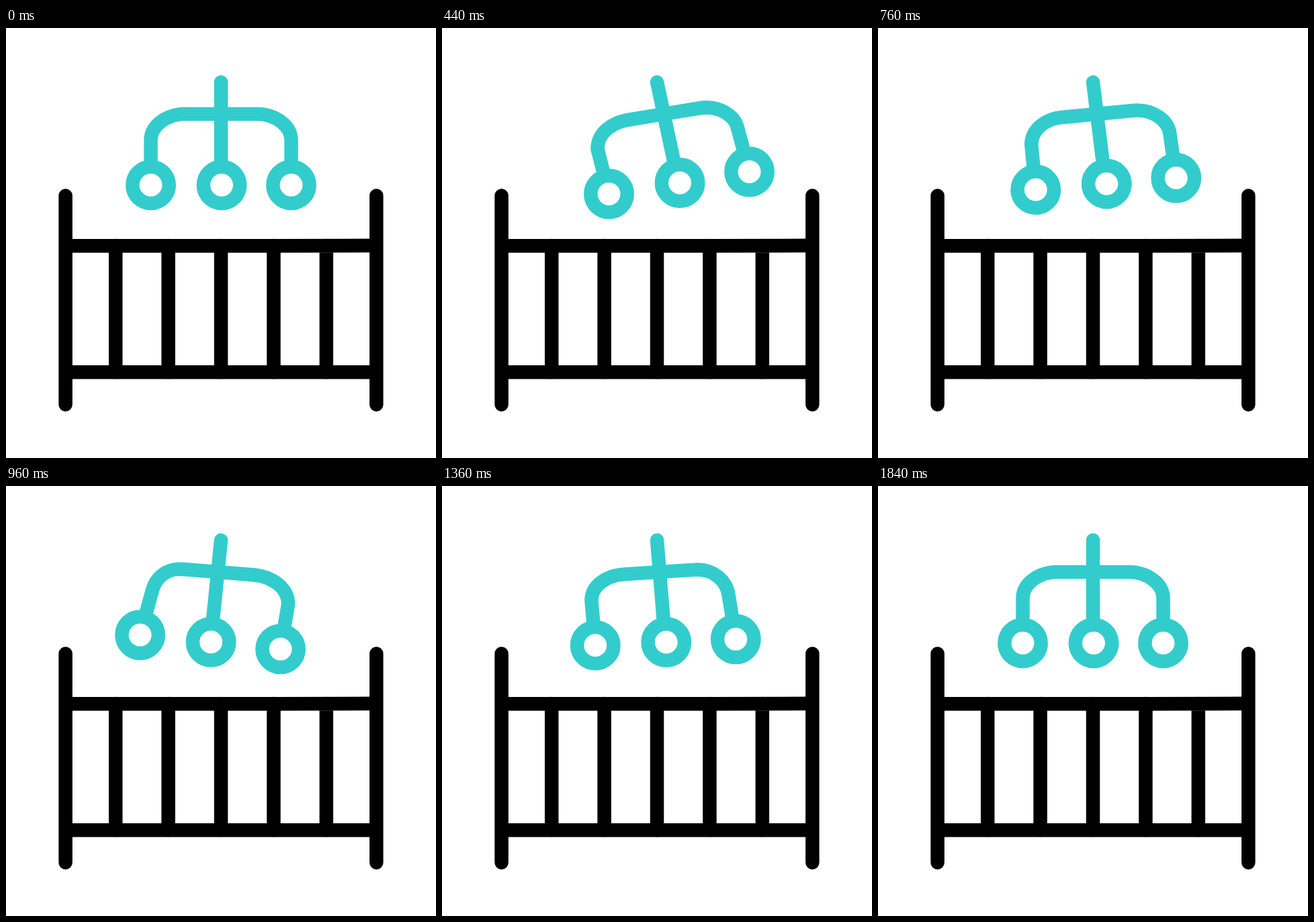
Animation of 640x640 px, one loop 2000 ms. Source, as an HTML page:

```html
<!DOCTYPE html>
<html lang="en">
<head>
<meta charset="utf-8">
<title>Crib mobile</title>
<style>
  html, body { margin: 0; width: 100%; height: 100%; overflow: hidden; background: #fff; }
  svg { display: block; width: 100vw; height: 100vh; }
  .crib, .mobile { fill: none; stroke-width: 20.5; stroke-linejoin: round; }
  .crib { stroke: #000; }
  .mobile { stroke: #33cccc; }
  .mobile circle { fill: #fff; }
  .round, #rod { stroke-linecap: round; }
  .seam { stroke: #444; stroke-width: .6; }
</style>
</head>
<body>
<svg viewBox="0 0 640 640">
  <g class="crib">
    <path class="round" d="M88.6 249.4V560.6M551.3 249.4V560.6"/>
    <path d="M88.6 324.2H398L551.3 323.8M88.6 512.2H551.3"/>
    <path class="round" id="slats"/>
    <path class="seam" d="M467 334.4H487"/>
  </g>
  <g class="mobile">
    <path id="rod"/>
    <path id="bar"/>
    <circle id="left" r="27.2"/>
    <circle id="mid" r="27.2"/>
    <circle id="right" r="27.2"/>
  </g>
</svg>
<script>
const LOOP = 2000, STEP = 40;
const CENTER = 320, BAR_Y = 128, BAR_HALF = 53, RING_Y = 233.8, SPREAD = 104.5, LEG = 66.8;
const ROUND = .55;
const $ = id => document.getElementById(id);

// [ms, half swings completed]
const pace = [[80, 0], [440, .78], [560, 1], [760, 1.39], [1000, 2], [1400, 3], [1840, 4]];

function phaseAt(t) {
  if (t <= pace[0][0]) return 0;
  const i = pace.findIndex(([ms]) => ms >= t);
  if (i < 0) return 4;
  const [t0, p0] = pace[i - 1], [t1, p1] = pace[i];
  return p0 + (p1 - p0) * (t - t0) / (t1 - t0);
}

// Starts and ends at zero, easing through the three turning points
function swing(phase, ...turns) {
  const stops = [0, ...turns, 0, 0];
  const i = Math.floor(phase);
  const ease = (1 - Math.cos((phase - i) * Math.PI)) / 2;
  return stops[i] + (stops[i + 1] - stops[i]) * ease;
}

function place(id, x, y) {
  $(id).setAttribute("cx", x);
  $(id).setAttribute("cy", y);
}

// Points of one arm, from the ring up to the bar; side is -1 or 1
function arm(side, sway, tilt, sag, bend) {
  const angle = -sway * .285 * Math.PI / 180;
  const ring = [CENTER + side * SPREAD + sway, RING_Y - side * tilt - sag];
  const elbow = [CENTER + side * SPREAD + bend, ring[1] - LEG];
  const end = [
    CENTER + sway * .31 + side * BAR_HALF * Math.cos(angle),
    BAR_Y + side * BAR_HALF * Math.sin(angle)
  ];
  // The elbow leaves upright, or leans inward along its leg
  const lean = side * Math.min(0, side * (elbow[0] - ring[0]) / LEG);
  const rise = (elbow[1] - end[1]) * ROUND;
  const reach = (elbow[0] - end[0]) * ROUND;
  const low = [elbow[0] + lean * rise, elbow[1] - rise];
  const high = [end[0] + reach, end[1] + reach * Math.tan(angle)];
  return { ring, elbow, low, high, end };
}

function draw(t) {
  const phase = phaseAt(t);
  const sway = swing(phase, 37.3, -17.3, 13.5);
  const tilt = swing(phase, 18.6, -11.2, 5);
  const sag = Math.abs(sway) * .1;
  const l = arm(-1, sway, tilt, sag, swing(phase, 18, 2, 7));
  const r = arm(1, sway, tilt, sag, swing(phase, 17, -5, 2));
  $("bar").setAttribute("d",
    `M${l.ring}L${l.elbow}C${l.low} ${l.high} ${l.end}` +
    `L${r.end}C${r.high} ${r.low} ${r.elbow}L${r.ring}`);
  $("rod").setAttribute("d", `M${CENTER} 80.6L${CENTER + sway * .97} ${RING_Y - sag}`);
  place("left", ...l.ring);
  place("mid", CENTER + 1 + sway, RING_Y - sag);
  place("right", ...r.ring);
}

let slats = "";
for (let i = -2; i <= 2; i++) slats += `M${CENTER + i * 78.4} 323.9V512`;
$("slats").setAttribute("d", slats);

const start = performance.now();
function tick() {
  const t = (performance.now() - start) % LOOP;
  draw(Math.floor(t / STEP) * STEP);
  requestAnimationFrame(tick);
}
tick();
</script>
</body>
</html>
```
